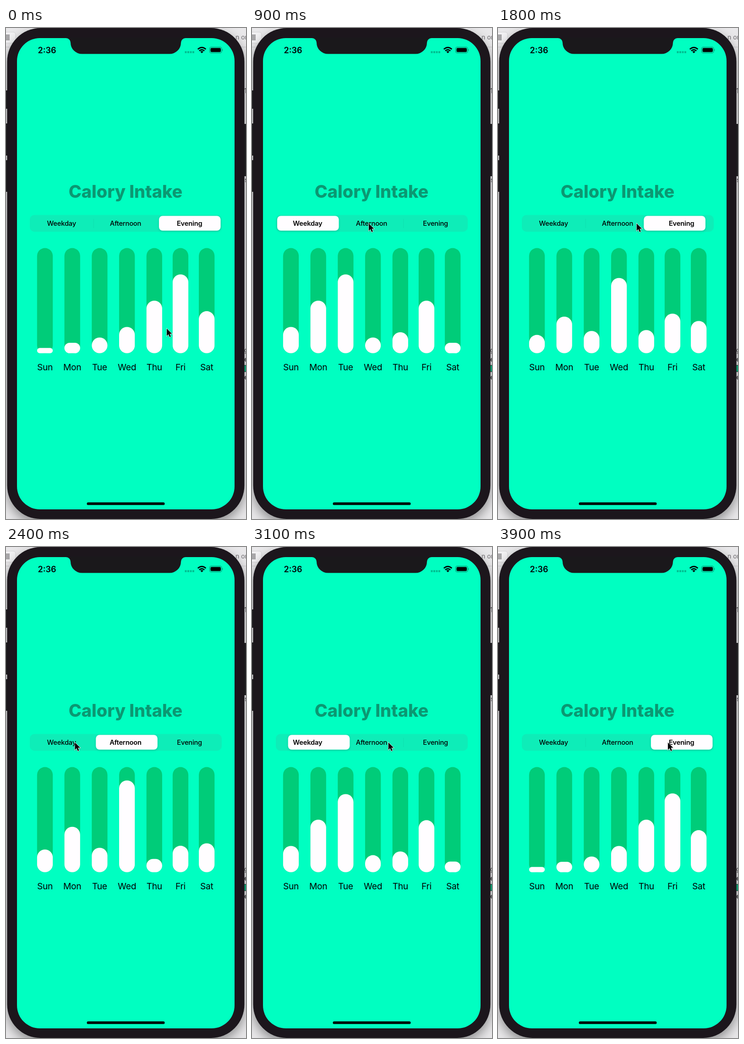
An HTML page for the animation above (4 s loop, 524 by 1070 pixels).

```html
<!DOCTYPE html>
<html lang="en">
<head>
<meta charset="utf-8">
<title>Calory Intake</title>
<style>
  html, body { margin: 0; width: 100%; height: 100%; overflow: hidden; background: #e3e2e4; }
  svg { display: block; width: 100%; height: 100%; }
  text { font-family: Inter, "Liberation Sans", sans-serif; }
  .mid { text-anchor: middle; }
  .seg { font-size: 14.7px; letter-spacing: -.2px; font-weight: 500; }
  .seg.on { font-weight: 600; }
  .day { font-size: 19.2px; letter-spacing: -.3px; }
  .edge { font-size: 14px; fill: #48464a; }
</style>
</head>
<body>
<svg viewBox="0 0 524 1070" xmlns="http://www.w3.org/2000/svg">
  <defs>
    <filter id="soft" x="-10%" y="-30%" width="120%" height="170%">
      <feDropShadow dx="0" dy="2" stdDeviation="2.5" flood-opacity=".14"/>
    </filter>
    <filter id="drop" x="-50%" y="-30%" width="220%" height="180%">
      <feDropShadow dx="0" dy="1" stdDeviation="1" flood-opacity=".3"/>
    </filter>
    <filter id="shade">
      <feDropShadow dx="0" dy="10" stdDeviation="12" flood-opacity=".4"/>
    </filter>
  </defs>

  <!-- window behind the phone -->
  <rect width="524" height="1070" fill="#e9e8ea"/>
  <rect x="-10" y="9" width="31" height="24" rx="5" fill="#f3f2f4" stroke="#d3d2d4"/>
  <rect y="14" width="8" height="13" fill="#a9a8aa"/>
  <text class="edge" x="501" y="25" fill-opacity=".75">n or</text>
  <path d="M0 41.5H524" stroke="#c9c8ca"/>
  <g class="edge">
    <text x="520" y="142">1</text>
    <text x="521" y="336">s</text>
    <text x="520" y="707">g</text>
    <text x="520" y="727" font-weight="700">e</text>
    <text x="520" y="766" font-weight="700">e</text>
  </g>
  <rect x="519" y="735" width="6" height="14" fill="#14b783" stroke="#222"/>

  <!-- phone -->
  <path d="M1 136V176M1 208V278M1 288V357M522 209V323" stroke="#252327" stroke-width="6"/>
  <rect x="2.5" y="0" width="518" height="1070" rx="73" fill="#1a181b" filter="url(#shade)"/>
  <rect x="24" y="22" width="475" height="1027" rx="50" fill="#00ffc1"/>
  <path d="M131 21V22A10 10 0 0 1 141 32A25 24.5 0 0 0 166 56.5H357A25 24.5 0 0 0 382 32A10 10 0 0 1 392 22V21Z" fill="#1a181b"/>
  <rect x="176.5" y="1033.8" width="170" height="5.8" rx="2.9"/>

  <!-- status bar -->
  <text class="mid" x="89.5" y="55" font-size="18" font-weight="600">2:36</text>
  <path d="M390.5 52.6H412" stroke="#00bd8f" stroke-width="4.2" stroke-dasharray="4 1.5"/>
  <g fill="none" stroke="#000" stroke-width="2.7">
    <path d="M418.8 46.3Q427.6 38.4 436.4 46.3"/>
    <path d="M422 49.8Q427.6 44.9 433.2 49.8"/>
  </g>
  <path d="M424.3 51.6Q427.6 49 430.9 51.6L427.6 55Z"/>
  <rect x="444.5" y="41.5" width="26.5" height="13" rx="3.8" fill="none" stroke="#000" stroke-opacity=".45" stroke-width="1.1"/>
  <rect x="446.5" y="43.5" width="22.5" height="9" rx="2.2"/>
  <path d="M472.3 46Q474.3 48 472.3 50Z" fill-opacity=".5"/>

  <text class="mid" x="261" y="370" font-size="37.8" font-weight="800" fill="#0b9872">Calory Intake</text>

  <rect x="52" y="407.5" width="419" height="36.5" rx="10" fill="#0eedb8"/>
  <g stroke="#10dfb0">
    <path id="sepL" d="M191.3 416V436"/>
    <path id="sepR" d="M330.8 416V436"/>
  </g>
  <rect id="pill" y="409.5" width="134.5" height="32" rx="8" fill="#fffdff" filter="url(#soft)"/>
  <g id="segs"></g>
  <g id="bars"></g>

  <path id="cursor" d="M0 0V16L3.7 12.6L6.2 18.6L9 17.4L6.5 11.6H11.5Z" stroke="#fff" stroke-width="1.3" paint-order="stroke" filter="url(#drop)"/>
</svg>
<script>
const LOOP = 4000, STEP = 100, BAR_MS = 350, MOVE_MS = 260;
const BAR_W = 34.3, BAR_H = 229.2, BASE = 708.8;
const TAB_X = 52, TAB_W = 139.7, TAB_Y = 426;
const $ = id => document.getElementById(id);

// calories per day, 20 is a full bar
const chart = {
  Weekday: [5, 10, 15, 3, 4, 10, 2],
  Afternoon: [5, 10, 5, 20, 1, 3, 5],
  Evening: [1, 2, 3, 5, 10, 15, 8]
};
const tabs = Object.keys(chart), levels = Object.values(chart);

// pointer stops: time and x; each one taps the tab under it
const stops = [[0, 351], [550, 150], [1080, 255], [1650, 371], [2150, 260], [2629, 150], [3070, 295], [3488, 371]];
const tabAt = x => Math.floor((x - TAB_X) / TAB_W);

function add(parent, tag, attrs, text = "") {
  const el = document.createElementNS("http://www.w3.org/2000/svg", tag);
  for (const k in attrs) el.setAttribute(k, attrs[k]);
  el.textContent = text;
  return parent.appendChild(el);
}

const labels = tabs.map((name, i) =>
  add($("segs"), "text", { class: "mid seg", x: TAB_X + TAB_W * (i + .5) - .6, y: 431 }, name));

const fills = "Sun Mon Tue Wed Thu Fri Sat".split(" ").map((name, i) => {
  // columns sit closer together after Thu
  const cx = 85 + 59.7 * i - 2.5 * Math.max(0, i - 4);
  const bar = { x: cx - BAR_W / 2, y: BASE - BAR_H, width: BAR_W, height: BAR_H, rx: BAR_W / 2 };
  add($("bars"), "rect", { ...bar, fill: "#00cc79" });
  add($("bars"), "text", { class: "mid day", x: cx, y: 746 }, name);
  return add($("bars"), "rect", { ...bar, fill: "#fffdff" });
});

const mix = (a, b, k) => a + (b - a) * k;
const smooth = s => s * s * (3 - 2 * s);

// cubic-bezier(.42, 0, .58, 1)
function easeInOut(x) {
  if (x >= 1) return 1;
  let lo = 0, hi = 1;
  for (let i = 0; i < 24; i++) {
    const s = (lo + hi) / 2, r = 1 - s;
    if (1.26 * s * r * r + 1.74 * s * s * r + s * s * s < x) lo = s; else hi = s;
  }
  return smooth(lo);
}

// critically damped spring
function spring(ms) {
  const w = ms * .025;
  return 1 - (1 + w) * Math.exp(-w);
}

function draw(t) {
  const i = stops.findLastIndex(stop => stop[0] <= t);
  const [tapped, x] = stops[i];
  const age = t - tapped;
  const to = tabAt(x), from = tabAt(stops[Math.max(0, i - 1)][1]);

  const k = easeInOut(age / BAR_MS);
  fills.forEach((el, d) => {
    const h = BAR_H * mix(levels[from][d], levels[to][d], k) / 20;
    el.setAttribute("y", BASE - h);
    el.setAttribute("height", h);
    el.setAttribute("rx", Math.min(BAR_W, h) / 2);
  });

  $("pill").setAttribute("x", TAB_X + 2.6 + TAB_W * mix(from, to, spring(age)));
  const shown = age < 50 ? from : to;
  labels.forEach((el, n) => el.classList.toggle("on", n === shown));
  $("sepL").setAttribute("opacity", shown === 2 ? 1 : 0);
  $("sepR").setAttribute("opacity", shown === 0 ? 1 : 0);

  const next = stops[Math.min(i + 1, stops.length - 1)][1];
  const m = smooth(Math.min(1, age / MOVE_MS));
  const y = i ? TAB_Y : mix(655, TAB_Y, m);
  $("cursor").setAttribute("transform", `translate(${mix(x, next, m)} ${y})`);
}

// the picture advances ten times a second
const start = performance.now();
function tick() {
  const t = (performance.now() - start) % LOOP;
  draw(Math.floor(t / STEP) * STEP);
  requestAnimationFrame(tick);
}
tick();
</script>
</body>
</html>
```
